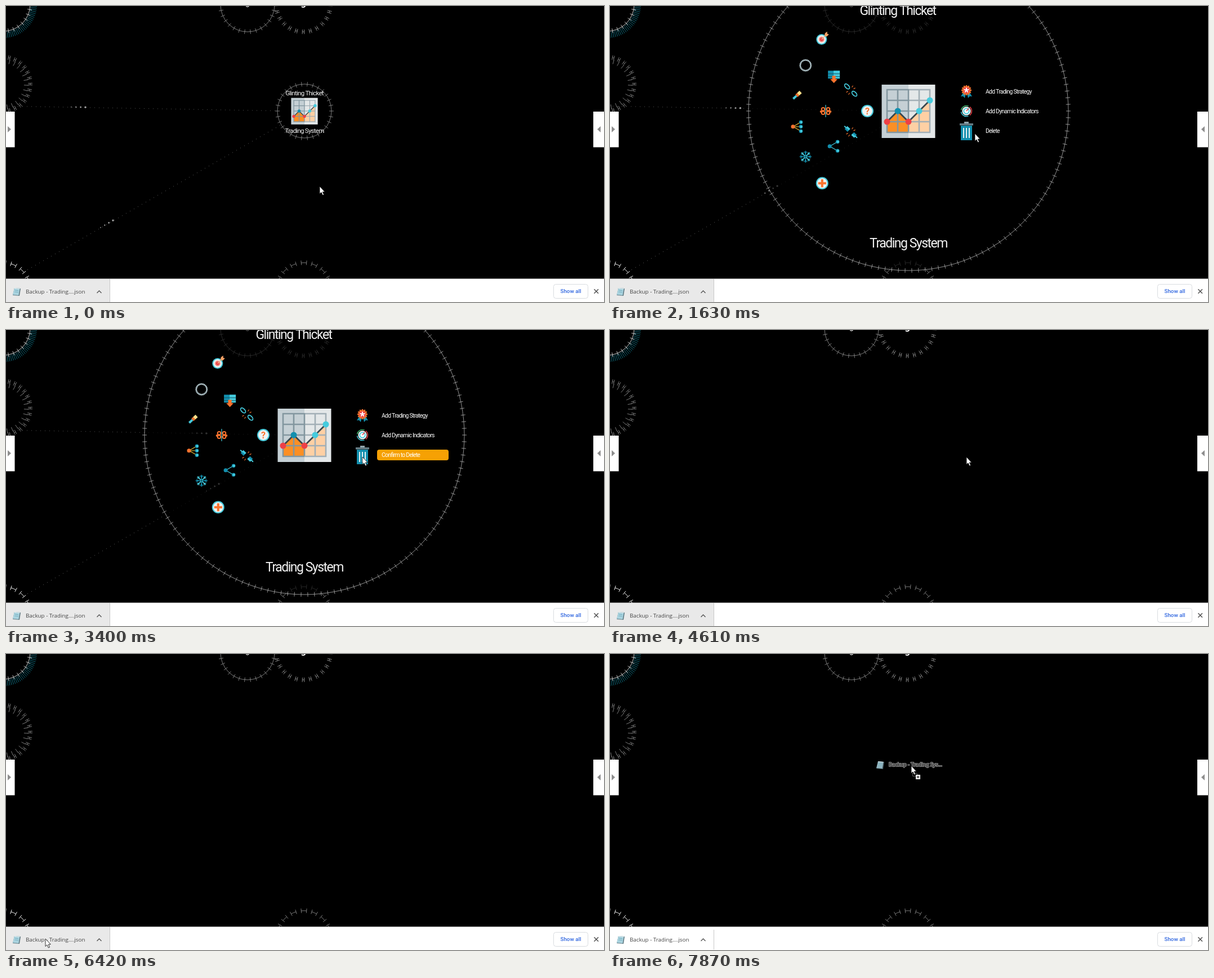
Animation of 1062x527 px, one loop 8 s. Source, as an HTML page with a canvas:

```html
<!DOCTYPE html>
<html lang="en">
<head>
<meta charset="utf-8">
<title>Trading system</title>
<style>
html, body { margin: 0; width: 100%; height: 100%; overflow: hidden; background: #000; }
canvas { display: block; width: 100vw; height: 100vh; }
</style>
</head>
<body>
<canvas id="stage" width="1062" height="527"></canvas>
<script>
const ctx = document.getElementById('stage').getContext('2d');
const LOOP = 8000, STEP = 130.7, TAU = Math.PI * 2, DEG = Math.PI / 180;
const CX = 530, CY = 187;
const TEAL = '#128fae', CYAN = '#45cbdd', ORANGE = '#f8732e', RED = '#ee3f45', PALE = '#eef3f3';
const CONFIRM = 2220, REMOVE = 4570, PRESS = 6660, DRAG = 6975, LIFT = 7050, DROP = 7842;

const mix = (a, b, k) => a + (b - a) * k;
const span = (t, from, to) => Math.min(1, Math.max(0, (t - from) / (to - from)));
const smooth = k => k * k * (3 - 2 * k);
const easeOut = power => k => 1 - (1 - k) ** power;
const mirror = draw => [-1, 1].forEach(draw);

// Each move eases from wherever the pointer was to a new place.
const moves = [
  { from: 280, to: 820, x: 543, y: 192, ease: smooth },
  { from: 1060, to: 1568, x: 648, y: 227, ease: smooth },
  { from: 2000, to: CONFIRM, x: 633, y: 226, ease: smooth },
  { from: 5200, to: 6400, x: 70, y: 507, ease: easeOut(3) },
  { from: DRAG, to: DROP, x: 535, y: 199, ease: easeOut(2) }
];
function pointerAt(t) {
  let x = 557, y = 321;
  for (const m of moves) {
    const k = m.ease(span(t, m.from, m.to));
    x = mix(x, m.x, k);
    y = mix(y, m.y, k);
  }
  return [x, y];
}

function rect(x, y, w, h, color) {
  ctx.fillStyle = color;
  ctx.fillRect(x, y, w, h);
}
function pill(x, y, w, h, paint) {
  ctx.beginPath();
  ctx.roundRect(x, y, w, h, 4);
  ctx[paint]();
}
function disc(x, y, r, color) {
  ctx.fillStyle = color;
  ctx.beginPath();
  ctx.arc(x, y, r, 0, TAU);
  ctx.fill();
}
function target(x, y, ...layers) {
  for (const [r, color] of layers) disc(x, y, r, color);
}
function arc(x, y, r, color, width, from = 0, to = TAU) {
  ctx.strokeStyle = color;
  ctx.lineWidth = width;
  ctx.beginPath();
  ctx.arc(x, y, r, from, to);
  ctx.stroke();
}
function trace(points) {
  ctx.beginPath();
  for (let i = 0; i < points.length; i += 2) ctx.lineTo(points[i], points[i + 1]);
}
function line(color, width, ...points) {
  trace(points);
  ctx.strokeStyle = color;
  ctx.lineWidth = width;
  ctx.stroke();
}
function poly(color, ...points) {
  trace(points);
  ctx.fillStyle = color;
  ctx.fill();
}
function text(str, x, y, font, color, align = 'left', spacing = 0) {
  ctx.font = font;
  ctx.letterSpacing = spacing + 'px';
  ctx.textAlign = align;
  ctx.textBaseline = 'middle';
  ctx.fillStyle = color;
  ctx.fillText(str, x, y);
  ctx.letterSpacing = '0px';
}
function placed(x, y, draw, scale = 1, turn = 0) {
  ctx.save();
  ctx.translate(x, y);
  ctx.scale(scale, scale);
  ctx.rotate(turn);
  draw();
  ctx.restore();
}

function spokes(x, y, from, to, n, color, width = .8, offset = 0) {
  ctx.strokeStyle = color;
  ctx.lineWidth = width;
  ctx.beginPath();
  for (let i = 0; i < n; i++) {
    const a = i / n * TAU + offset, c = Math.cos(a), s = Math.sin(a);
    ctx.moveTo(x + c * from, y + s * from);
    ctx.lineTo(x + c * to, y + s * to);
  }
  ctx.stroke();
}
function railRing(x, y, r, n, color) {
  arc(x, y, r, color, .8);
  spokes(x, y, r - 4, r + 4, n, color);
}
function dashRing(x, y, r, n, gap, color, width = .8) {
  const offset = -Math.PI / 2 - gap / 2;
  for (const shift of [0, gap]) spokes(x, y, r - 4, r + 4, n, color, width, offset + shift);
  for (let i = 0; i < n; i++) {
    const a = offset + i / n * TAU;
    arc(x, y, r, color, width, a, a + gap);
  }
}

function surroundings() {
  spokes(-5, -3, 49, 60, 110, '#0f7588', .9);
  railRing(-5, -3, 48, 32, '#f2f2f2');
  railRing(429, -2, 48, 30, '#999');
  dashRing(528, -2, 48, 24, .07, '#aaa');
  dashRing(-5, 139, 48, 28, .06, '#999');
  spokes(-5, 139, 37, 45, 28, '#999', .8, .05);
  dashRing(-5, 505, 48, 16, .196, '#eee', 1);
  dashRing(529, 505, 48, 16, .196, '#999');
  text('g', 429, -5, '14px Roboto, sans-serif', '#fff', 'center');
  text('g', 528, -5, 'bold 17px Roboto, sans-serif', '#fff', 'center');
}

// A dotted line into the hub with a brighter pulse running along it.
function stream(slope, startX, head, gap) {
  const yAt = x => CY + (CX - x) * slope;
  for (let x = startX; x < 488; x += gap) rect(x, yAt(x), 1, 1, '#555');
  for (let i = 0; i < 4; i++) {
    const x = head - i * gap * 1.05;
    disc(x, yAt(x), 1.7 - i * .28, '#a0a0a0');
  }
}

function chart(size) {
  placed(CX, CY, () => {
    const u = 19, left = '#82969f', right = '#a2afb6';
    rect(-47.5, -47, 47.5, 95, '#c5d0d5');
    rect(0, -47, 47.5, 95, '#e4e8e9');
    poly('#fc8f24', -2 * u, 2 * u, -2 * u, u, -u, 0, 0, u, 0, 2 * u);
    poly('#fed0a4', 0, 2 * u, 0, u, u, 0, 2 * u, -u, 2 * u, 2 * u);
    for (let i = -2; i <= 2; i++) {
      line(left, 2.6, -39, i * u, 0, i * u);
      line(right, 2.6, 0, i * u, 39, i * u);
      line(i < 1 ? left : right, 2.6, i * u, -39, i * u, 39);
    }
    line('#37474f', 2.8, -2 * u, u, -u, 0, 0, u, u, 0, 2 * u, -u);
    [RED, TEAL, RED, CYAN, CYAN].forEach((color, i) =>
      disc((i - 2) * u, i === 4 ? -u : i % 2 ? 0 : u, 5.5, color));
  }, size / 95.5);
}

function share(hub, link, n) {
  for (let i = 0; i < n; i++) {
    const y = mix(-8, 8, i / (n - 1));
    line(link, 1.1, -7, 0, 7, y);
    disc(7, y, 3.3, TEAL);
    disc(7.6, y, 2.2, CYAN);
  }
  disc(-7, 0, 3.5, hub);
}
function sparks() {
  mirror(s => {
    line(ORANGE, 1.2, s * 5, -s * 2, s * 8, -s * 4);
    line(ORANGE, 1.2, s * 2, -s * 5, s * 4, -s * 8);
  });
}

const icons = {
  aim() {
    target(-1, 1, [9.5, CYAN], [7.5, PALE], [5, '#f0958a'], [3, RED]);
    line('#e9b98a', 1.6, -1, 1, 7, -7);
    poly('#f4a165', 4, -5, 5, -10, 9, -13, 9, -9, 12, -8, 8, -4);
  },
  gear() {
    arc(0, 0, 9.5, '#80969d', 2.3);
    spokes(0, 0, 8, 11, 24, '#d5e0e2', 1);
  },
  torch() {
    placed(0, 0, () => {
      rect(-9, -2, 8, 4, CYAN);
      rect(-1, -3, 4, 6, ORANGE);
      rect(3, -3, 6, 6, '#ffe08a');
    }, 1, -.75);
  },
  spread: () => share(ORANGE, '#e8bf3c', 3),
  freeze() {
    for (let i = 0; i < 8; i++) placed(0, 0, () => {
      const color = i % 2 ? CYAN : TEAL;
      line(color, 1.7, 1, 0, 10.5, 0);
      line(color, 1.2, 9, -2.5, 6, 0, 9, 2.5);
    }, 1, i * TAU / 8);
  },
  add() {
    target(0, 0, [11, CYAN], [9, PALE]);
    rect(-7, -2, 14, 4, ORANGE);
    rect(-2, -7, 4, 14, ORANGE);
  },
  store() {
    rect(-10, -9, 21, 14, TEAL);
    rect(0, -9, 11, 14, CYAN);
    for (const y of [-4, 1]) rect(-10, y, 21, 1, '#155261');
    rect(-2.5, 0, 6, 7, ORANGE);
    poly(ORANGE, -6, 6, 7, 6, .5, 13);
  },
  brain() {
    mirror(s => {
      mirror(v => arc(s * 4.5, v * 3.3, 2.8, ORANGE, 2));
      disc(s * 8.3, 1, 2, ORANGE);
    });
    line(CYAN, 1.2, 0, -11, 0, 11);
  },
  link: () => share(TEAL, CYAN, 2),
  chain() {
    mirror(s => placed(s * 6.5, s * 6.5, () => {
      ctx.beginPath();
      ctx.ellipse(0, 0, 5.5, 3, 0, 0, TAU);
      ctx.strokeStyle = CYAN;
      ctx.lineWidth = 1.8;
      ctx.stroke();
    }, 1, .8));
    sparks();
  },
  plug() {
    mirror(s => placed(s * 5.5, s * 5, () => {
      rect(-4, -3.5, 7, 7, TEAL);
      rect(-4, -3.5, 7, 3.5, CYAN);
      line(CYAN, 2, -8, 0, -3, 0);
    }, 1, s < 0 ? .75 : .75 + Math.PI));
    sparks();
  },
  help() {
    target(0, 0, [11, CYAN], [9, PALE]);
    text('?', 0, 1, 'bold 16px Roboto, sans-serif', ORANGE, 'center');
  },
  badge() {
    mirror(s => poly(TEAL, s, 3, s * 5, 1, s * 10, 9, s * 6, 8.5, s * 3, 12));
    spokes(0, -2, 0, 9, 12, ORANGE, 2.5);
    target(0, -2, [7.5, ORANGE], [5.5, RED]);
    spokes(0, -2, 0, 4.5, 5, '#fff', 2, -Math.PI / 2);
  },
  gauge() {
    [RED, CYAN, '#42b56c'].forEach((color, i) => arc(0, 0, 9.5, color, 1.5, i * 2.1 - .9, i * 2.1 + .9));
    target(0, 0, [7.7, PALE], [5.6, CYAN], [3.8, '#fff']);
    line(RED, 1.5, 0, 0, 4, -5);
  },
  bin() {
    rect(-10, -9, 20, 26, TEAL);
    for (const x of [-5, 0, 5]) rect(x - 1, -5, 2, 18, '#e4f1f3');
    rect(-12, -13, 24, 3.5, '#687f88');
    rect(-4, -16, 8, 3, '#93a5ac');
  }
};

// Spread icons evenly over an arc on the left of the hub.
function fan(radius, gap, grown, ...names) {
  names.forEach((name, i) => {
    const a = Math.PI + (i - (names.length - 1) / 2) * -gap * DEG;
    placed(CX + Math.cos(a) * radius * grown, CY + Math.sin(a) * radius * grown, icons[name], grown);
  });
}

function menu(t, grown) {
  const confirm = t >= CONFIRM;
  ctx.globalAlpha = grown;
  fan(200, 16, grown, 'aim', 'gear', 'torch', 'spread', 'freeze', 'add');
  fan(147, 25.3, grown, 'store', 'brain', 'link');
  fan(109, 40, grown, 'chain', 'plug');
  fan(73, 0, grown, 'help');
  if (confirm) {
    ctx.fillStyle = '#f6a104';
    pill(659, 213, 127, 19, 'fill');
  }
  const items = { badge: 'Add Trading Strategy', gauge: 'Add Dynamic Indicators',
    bin: confirm ? 'Confirm to Delete' : 'Delete' };
  Object.entries(items).forEach(([name, label], i) => {
    const y = CY + (i - 1) * 35 * grown;
    placed(CX + 103 * grown, y, icons[name], grown);
    text(label, CX + 137 * grown, y + .5, '10.5px Roboto, sans-serif', '#fff', 'left', -.8);
  });
  ctx.globalAlpha = 1;
}

function node(t) {
  const grown = smooth(span(t, 650, 1046)), r = mix(48, 284, grown);
  disc(CX, CY, r, 'rgba(0,0,0,.68)');
  railRing(CX, CY, r, grown ? 150 : 30, grown ? '#b5b5b5' : '#999');
  chart(mix(47.5, 95.5, grown));

  const size = mix(11.5, 23, grown);
  const title = (str, x, y) =>
    text(str, x, y, size + 'px Roboto, sans-serif', '#f4f4f4', 'center', -size * .065);
  title('Glinting Thicket', mix(530, 511, grown), mix(156, 9, grown));
  title('Trading System', CX, mix(223, 423.5, grown));
  if (grown) menu(t, grown);
}

function fileIcon(x, y) {
  placed(x, y, () => {
    poly('#5d7780', 3, 0, 14, 1, 12, 14, 0, 13);
    poly('#a9d3df', 3, 0, 12.5, 1, 10.5, 13, 0, 12);
    for (const v of [4, 7]) line('#78b0c0', 1, 3.7, v, 9.7, v + .6);
    line('#e3eef0', 1.2, 3, .7, 12.5, 1.5);
  });
}

function downloadBar(t) {
  const lifted = t >= LIFT;
  rect(0, 485.5, 1062, 42, '#fff');
  if (!lifted) rect(0, 486, 184, 41, t < PRESS ? '#e9e9e9' : '#dfdfdf');
  rect(184, lifted ? 491 : 486, 1, lifted ? 35 : 41, '#c8c8c8');
  fileIcon(12, 502);
  text('Backup - Trading....json', 35, 509, '9.8px "Open Sans", sans-serif', '#444');
  line('#555', 1.4, 161.5, 511, 165.5, 507, 169.5, 511);

  ctx.strokeStyle = '#d9dce0';
  ctx.lineWidth = 1;
  pill(972.5, 495.5, 61, 25, 'stroke');
  text('Show all', 1003, 508, '500 9.8px Roboto, sans-serif', '#2f66e0', 'center');
  mirror(s => line('#555', 1.6, 1044.5, 508 - s * 3.7, 1052, 508 + s * 3.7));
}

function sidePanels() {
  rect(0, 188, 15.5, 63.5, '#fff');
  rect(1043, 188, 19, 63.5, '#fff');
  poly('#8e8e8e', 3, 214, 9, 219.5, 3, 225);
  poly('#8e8e8e', 1056, 214, 1050, 219.5, 1056, 225);
}

function ghost(x, y) {
  const str = 'Backup - Trading Sys...', font = '9.2px "Open Sans", sans-serif';
  ctx.globalAlpha = .75;
  fileIcon(x, y);
  ctx.globalAlpha = 1;
  ctx.save();
  ctx.lineJoin = 'round';
  ctx.lineWidth = 2;
  ctx.strokeStyle = '#8b8b8b';
  ctx.font = font;
  ctx.textAlign = 'left';
  ctx.textBaseline = 'middle';
  ctx.strokeText(str, x + 22, y + 6.5);
  ctx.restore();
  text(str, x + 22, y + 6.5, font, '#111');
}

function cursor(x, y, dragging) {
  placed(x, y, () => {
    const arrow = [0, 0, 0, 13.5, 3, 10.8, 5.4, 16, 7.6, 15, 5.3, 10, 9.3, 10, 0, 0];
    poly('#fff', ...arrow);
    line('#000', .8, ...arrow);
    if (!dragging) return;
    ctx.setLineDash([2, 1]);
    ctx.strokeStyle = '#999';
    ctx.strokeRect(2.5, 13.5, 8, 5);
    rect(8, 16, 8, 8, '#fff');
    rect(9.5, 19.5, 5, 1, '#000');
    rect(11.5, 17.5, 1, 5, '#000');
  });
}

function render(now) {
  const t = Math.floor(now / STEP) * STEP;
  rect(0, 0, 1062, 527, '#000');
  surroundings();
  if (t < REMOVE) {
    stream(-.0175, 5, 141 + .0529 * t + 3.04e-6 * t * t, 8);
    stream(.573, 38, 190 + .0793 * t - 7.05e-6 * t * t, 7);
    node(t);
  }
  sidePanels();
  downloadBar(t);

  const [x, y] = pointerAt(t), dragging = t >= LIFT;
  if (dragging) {
    const caught = easeOut(2)(span(t, DRAG, DROP));
    ghost(x - mix(93, 62, caught), y + mix(11, -8, caught));
  }
  cursor(x, y, dragging);
}

const start = performance.now();
function loop() {
  render((performance.now() - start) % LOOP);
  requestAnimationFrame(loop);
}
loop();
</script>
</body>
</html>
```
